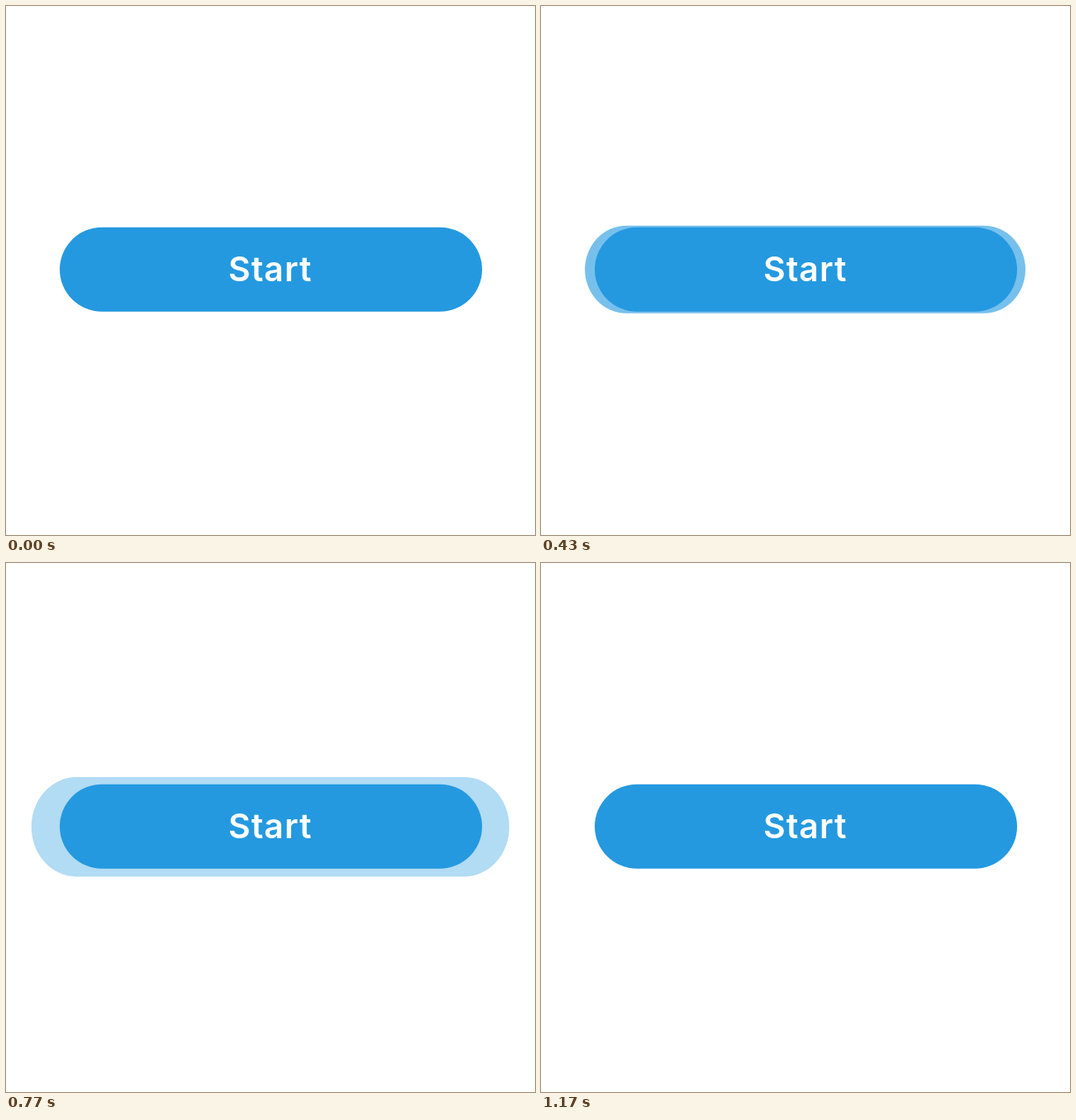
Write an HTML page with a canvas that moves like this. It is 640 by 640 pixels and loops after 1210 ms.

```html
<!DOCTYPE html>
<html lang="en">
<head>
<meta charset="utf-8">
<title>Start button</title>
<style>
  html, body { margin: 0; width: 100%; height: 100%; overflow: hidden; background: #fff; }
  canvas { display: block; }
</style>
</head>
<body>
<canvas id="stage" width="640" height="640"></canvas>
<script>
const ctx = document.getElementById('stage').getContext('2d');
const LOOP = 1210;
const BLUE = '#2499e0';

function pill(left, top, right, bottom, rx, alpha) {
  const ry = (bottom - top) / 2, cy = top + ry;
  ctx.globalAlpha = alpha;
  ctx.fillStyle = BLUE;
  ctx.beginPath();
  ctx.ellipse(left + rx, cy, rx, ry, 0, Math.PI / 2, Math.PI * 1.5);
  ctx.ellipse(right - rx, cy, rx, ry, 0, -Math.PI / 2, Math.PI / 2);
  ctx.fill();
  ctx.globalAlpha = 1;
}

// 25 steps a second shown at 30 pictures a second, so every sixth one repeats
function haloStep(t) {
  const tick = Math.floor((Math.floor(t / 10) * 10 + 4) * 0.03);
  return Math.min(Math.floor((tick * 5 + 2) / 6) - 7, 19);
}

function halo(p) {
  const left = 64.3 - 2.8 * p, right = 574.7 + 2.85 * p;
  pill(left, 268.9 - 0.815 * p, right, 368 + 0.95 * p,
       (right - left) * 0.094, 0.754 - 0.0338 * p);
}

function label() {
  ctx.font = '600 41px Inter, sans-serif';
  ctx.letterSpacing = '1px';
  ctx.textAlign = 'left';
  ctx.fillStyle = '#fff';
  ctx.fillText('Start', 269, 333);
}

function draw(now) {
  const t = now % LOOP;
  ctx.fillStyle = '#fff';
  ctx.fillRect(0, 0, 640, 640);
  if (t >= 270 && t < 1170) halo(haloStep(t));
  pill(65, 267.7, 576, 369.7, 51, 1);
  label();
}

let start;
function loop(now) {
  start ??= now;
  draw(now - start);
  requestAnimationFrame(loop);
}
draw(0);
requestAnimationFrame(loop);
</script>
</body>
</html>
```
